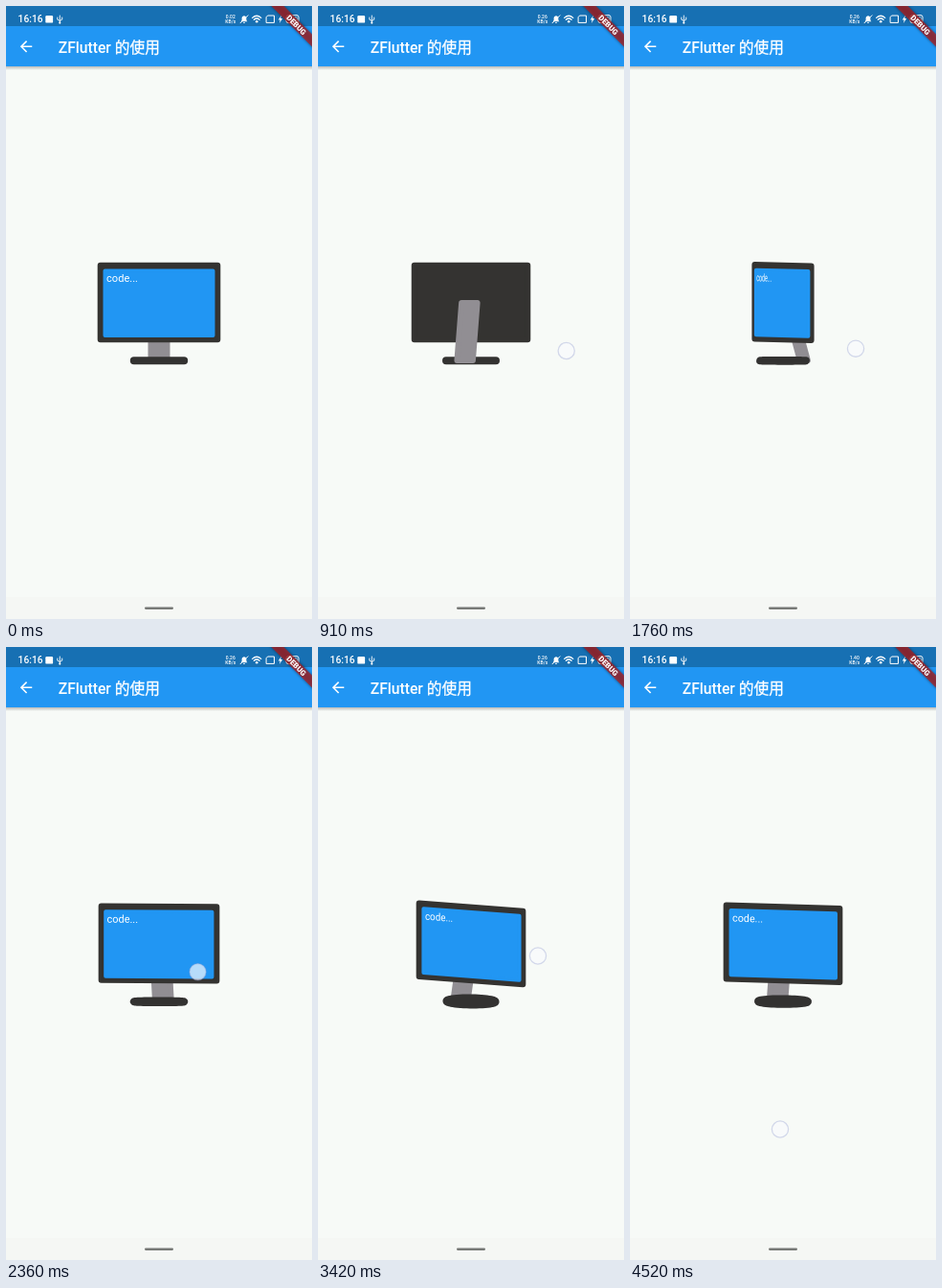
These frames come from a looping animation (320x640 px, 4560 ms). An HTML page:

```html
<!DOCTYPE html>
<html lang="zh">
<head>
<meta charset="utf-8">
<title>ZFlutter</title>
<style>
html, body { margin: 0; width: 100%; height: 100%; overflow: hidden; background: #f7faf7; }
svg { display: block; width: 100%; height: 100%; font-family: Roboto, "Noto Sans CJK SC", "Noto Sans CJK", sans-serif; }
.solid { stroke-linejoin: round; stroke-linecap: round; }
.line { fill: none; stroke: #fff; stroke-linecap: round; stroke-linejoin: round; }
</style>
</head>
<body>
<svg viewBox="0 0 320 640">
  <defs>
    <linearGradient id="shade" x2="0" y2="1">
      <stop offset="0" stop-color="#000" stop-opacity=".25"/>
      <stop offset="1" stop-color="#000" stop-opacity="0"/>
    </linearGradient>
    <filter id="soft" x="-30%" y="-80%" width="160%" height="260%"><feGaussianBlur stdDeviation="1.5"/></filter>
  </defs>
  <rect width="320" height="640" fill="#f7faf7"/>
  <rect y="617" width="320" height="23" fill="#f5f7f4"/>
  <rect x="145" y="627.6" width="30" height="2.3" rx="1.1" fill="#777976"/>

  <rect y="63" width="320" height="4" fill="url(#shade)"/>
  <rect width="320" height="63" fill="#2196f3"/>
  <rect width="320" height="21" fill="#1770b3"/>
  <path fill="#fff" transform="translate(11.7 33) scale(.778)" d="M20 11H7.83l5.59-5.59L12 4l-8 8 8 8 1.41-1.41L7.83 13H20z"/>
  <text x="54.7" y="49.4" font-size="15.7" font-weight="500" fill="#fff">ZFlutter <tspan stroke="#fff" stroke-width=".3">的使用</tspan></text>

  <g fill="#fff">
    <text x="12.6" y="17.4" font-size="10.2" font-weight="500">16:16</text>
    <rect x="41.3" y="10" width="7.8" height="7.6" rx="1.2"/>
    <path class="line" stroke-width=".9" d="M56.3 10v8M53.8 12v2.2l2.5 1.3 2.4-1.3V12"/>
    <circle cx="56.3" cy="17.5" r="1.1"/>
    <g font-size="5" font-weight="500" text-anchor="middle">
      <text id="rate" x="234.8" y="13.2">0.02</text>
      <text x="234.8" y="17.8">KB/s</text>
    </g>
    <path d="M245.6 16.3l1-1.2v-2.3c0-3.4 4.8-3.4 4.8 0v2.3l1 1.2zM248 17h2a1 1 0 0 1-2 0z"/>
    <path class="line" stroke-width="1" d="M245 17.8l8-8"/>
    <path class="line" stroke-width="1.2" d="M257.6 12.4q4.6-4.3 9.2 0M259.3 14.3q2.9-2.6 5.8 0"/>
    <circle cx="262.2" cy="16.3" r="1.3"/>
    <path class="line" stroke-width="1" d="M274 10h6.5v7.4h-8.4v-5.3z"/>
    <path d="M288 9.6l-3.2 4.8h1.9l-.8 3.6 3.3-5h-2z"/>
    <rect class="line" x="293" y="9.6" width="13" height="8" rx="2"/>
    <text x="299.5" y="16" font-size="6.5" text-anchor="middle">100</text>
  </g>
  <g transform="translate(320 0) rotate(45)">
    <rect x="-33" y="20.8" width="66" height="9.3" opacity=".45" filter="url(#soft)"/>
    <rect x="-33" y="20.8" width="66" height="9.3" fill="#b71c1c" fill-opacity=".7"/>
    <text x="2.5" y="28.3" font-size="7.9" font-weight="900" fill="#fff" text-anchor="middle">DEBUG</text>
  </g>

  <g id="model">
    <polygon id="base" class="solid" fill="#333231" stroke="#333231" stroke-width="8"/>
    <polygon id="neck" class="solid" fill="#918e93" stroke="#918e93" stroke-width="6"/>
    <g id="monitor">
      <polygon id="frame" class="solid" fill="#343331" stroke="#343331" stroke-width="6"/>
      <g id="face">
        <polygon id="glass" class="solid" fill="#2196f3" stroke="#2196f3" stroke-width="4"/>
        <text id="code" x="-55" y="-52" font-size="11.1" fill="#fff">code...</text>
      </g>
    </g>
  </g>
  <circle id="touch" r="8.6" fill="#f8fafc" fill-opacity=".7" stroke="#97a0d2" stroke-opacity=".38" stroke-width="1.3"/>
</svg>
<script>
const LOOP = 4560, CX = 160, CY = 340;
const GAIN = 1.2; // degrees turned per dragged pixel
const $ = id => document.getElementById(id);

// Key points of each drag: [ms, x, y]
const drags = [
  [[60, 122, 360], [1160, 300, 360]],
  [[1190, 165, 357], [1450, 202.5, 357], [2150, 278, 358.5]],
  [[2240, 200, 339], [2360, 200.5, 339], [2720, 232, 403]],
  [[2750, 230, 395], [2910, 242, 352.5], [3120, 242, 306], [3420, 230, 322.5], [4060, 219, 324]],
  [[4370, 157, 503.5], [LOOP, 157, 503.5]]
];

function touchAt(drag, t) {
  const next = drag.findIndex(k => k[0] > t);
  if (next < 0) return drag[drag.length - 1];
  const a = drag[next - 1], b = drag[next];
  const u = (t - a[0]) / (b[0] - a[0]);
  return a.map((v, i) => v + (b[i] - v) * u);
}

// Every drag adds its travel to the turn left by the ones before it.
function poseAt(t) {
  const pose = { x: 0, y: 0, yaw: 0, pitch: 0, down: false };
  for (const drag of drags) {
    const [t0, x0, y0] = drag[0];
    if (t < t0) break;
    const [, x, y] = touchAt(drag, t);
    pose.x = x;
    pose.y = y;
    pose.yaw += (x - x0) * GAIN;
    pose.pitch += (y - y0) * GAIN;
    pose.down = t < drag[drag.length - 1][0];
  }
  return pose;
}

const quad = (w, top, bottom, zTop, zBottom) => [
  [-w / 2, top, zTop], [w / 2, top, zTop], [w / 2, bottom, zBottom], [-w / 2, bottom, zBottom]
];
const ellipse = (rx, rz, y, n = 48) => Array.from({ length: n }, (_, i) => {
  const a = i / n * 2 * Math.PI;
  return [rx * Math.cos(a), y, rz * Math.sin(a)];
});
const shapes = {
  frame: quad(122.6, -69.2, 8.2, 0, 0),
  glass: quad(113, -63.6, 4, 1, 1),
  neck: quad(17, -30, 30, -6.4, -24.8),
  base: ellipse(26.2, 23.2, 30.3)
};

function draw(t) {
  const { x, y, yaw, pitch, down } = poseAt(t);
  const rad = Math.PI / 180;
  const c = Math.cos(yaw * rad), s = Math.sin(yaw * rad);
  const cp = Math.cos(pitch * rad), sp = Math.sin(pitch * rad);
  const project = ([px, py, pz]) => {
    const z = pz * c - px * s;
    return [CX + px * c + pz * s, CY + py * cp + z * sp];
  };
  for (const id in shapes) {
    $(id).setAttribute("points", shapes[id].map(p => project(p).map(v => v.toFixed(2))).join(" "));
  }
  $("code").setAttribute("transform", `matrix(${[c, -s * sp, 0, cp, ...project([0, 0, 1.5])]})`);
  $("face").style.display = c * cp > 0 ? "" : "none";

  // Painter's order by mean depth
  [["base", -30 * sp], ["neck", -15 * c * cp], ["monitor", 30 * sp]]
    .sort((a, b) => a[1] - b[1])
    .forEach(([id]) => $("model").appendChild($(id)));

  const touch = $("touch");
  touch.style.display = down ? "" : "none";
  touch.setAttribute("cx", x);
  touch.setAttribute("cy", y);
  $("rate").textContent = t < 300 ? "0.02" : t < 4330 ? "0.26" : "1.40";
}

const start = performance.now();
function tick() {
  draw((performance.now() - start) % LOOP);
  requestAnimationFrame(tick);
}
tick();
</script>
</body>
</html>
```
